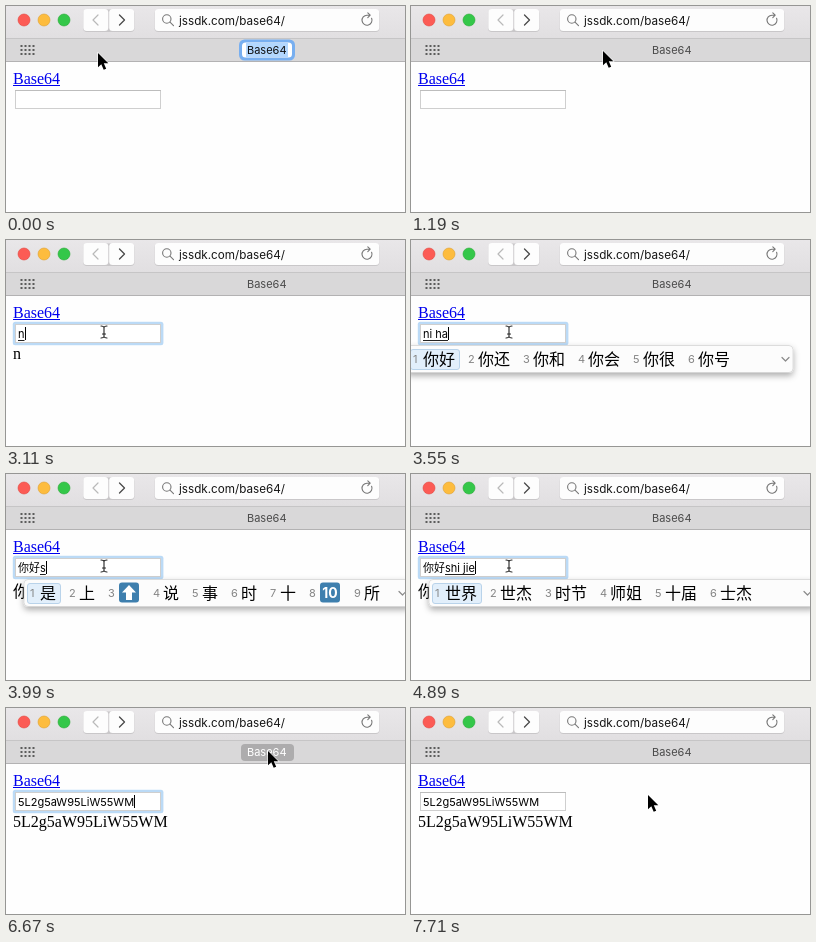
An HTML page for the animation above (8000 ms loop, 399x206 px).

```html
<!DOCTYPE html>
<html lang="zh-CN">
<head>
<meta charset="utf-8">
<title>Base64 bookmarklet</title>
<style>
  html, body { margin: 0; width: 100%; height: 100%; overflow: hidden; background: #fefefe; }
  svg { display: block; width: 100vw; height: 100vh; }
  text { white-space: pre; }
  .ui { font-family: Inter, "Noto Sans CJK SC", "Noto Sans CJK", sans-serif; font-size: 11px; }
  .page { font-family: "Liberation Serif", "Noto Sans CJK SC", "Noto Sans CJK", serif; font-size: 16px; }
  .cjk { font-family: "Noto Sans CJK SC", "Noto Sans CJK", sans-serif; font-size: 16px; }
  .line { fill: none; stroke-linecap: round; stroke-linejoin: round; }
</style>
</head>
<body>
<svg viewBox="0 0 399 206">
  <defs>
    <linearGradient id="bar" x2="0" y2="1">
      <stop stop-color="#e9e7e9"/><stop offset="1" stop-color="#e1dfe1"/>
    </linearGradient>
    <filter id="shadow" x="-10%" y="-40%" width="120%" height="200%">
      <feDropShadow dx="0" dy="3" stdDeviation="3" flood-opacity=".32"/>
    </filter>
  </defs>

  <!-- browser chrome -->
  <rect width="399" height="32" fill="url(#bar)"/>
  <rect y="32" width="399" height="23" fill="#d9d8d9"/>
  <path d="M0 32.5H399" stroke="#c6c5c6"/>
  <path d="M0 55.5H399" stroke="#b3b2b3"/>
  <g stroke-width=".6">
    <circle cx="18" cy="14" r="6" fill="#fc5b55" stroke="#e2463f"/>
    <circle cx="38" cy="14" r="6" fill="#fdbc3e" stroke="#e0a030"/>
    <circle cx="58" cy="14" r="6" fill="#34c749" stroke="#27aa35"/>
  </g>
  <g fill="#c9c7c9">
    <rect x="77" y="3.5" width="51.5" height="22.5" rx="4"/>
    <rect x="148.5" y="3.5" width="225" height="22.5" rx="4"/>
  </g>
  <g fill="#fdfdfd">
    <rect x="77.3" y="3" width="25" height="22" rx="3.5"/>
    <rect x="103.2" y="3" width="25" height="22" rx="3.5"/>
    <rect x="148.8" y="3" width="224.4" height="22" rx="3.5"/>
  </g>
  <path class="line" d="M92 9L87 14L92 19" stroke="#b9b9b9" stroke-width="1.2"/>
  <path class="line" d="M113.5 9L118.5 14L113.5 19" stroke="#4a4a4a" stroke-width="1.3"/>
  <g class="line" stroke="#777" stroke-width="1.1">
    <circle cx="160.8" cy="13" r="4.2"/><path d="M164 16.2L167.5 19.7"/>
    <path d="M365.6 12.2A5 5 0 1 1 361 9.2H363.6M361.8 6.8L364.2 9.2L361.8 11.6"/>
  </g>
  <text class="ui" x="173" y="18.5" style="font-size:11.7px" fill="#151515">jssdk.com/base64/</text>
  <g id="dots" fill="#5c5c5c"></g>

  <!-- bookmark -->
  <g id="editing">
    <rect x="233" y="33.5" width="56" height="21" rx="5.5" fill="#78aff0"/>
    <rect x="236" y="36.5" width="50" height="15" rx="3.5" fill="#fff"/>
    <rect x="240" y="37" width="42" height="14" fill="#b3d7fe"/>
  </g>
  <rect id="hover" x="235" y="36" width="53" height="17" rx="4" fill="#adacad"/>
  <text id="bookmark" class="ui" x="241" y="48">Base64</text>

  <!-- page -->
  <text class="page" x="7" y="78" fill="#0000ee">Base64</text>
  <path d="M7 79.5H54" stroke="#0000ee"/>
  <rect id="ring" x="6.8" y="81.8" width="150.6" height="23.4" rx="2.5" fill="#bbdaf6"/>
  <rect x="9.5" y="84.5" width="145" height="18" fill="#fff" stroke="#cfcfcf"/>
  <path id="fieldTop" d="M9 84.5H155" stroke="#bdbdbd"/>
  <text id="field" class="ui" x="12" y="98" fill="#000"></text>
  <path id="underline" stroke="#222" stroke-width="1"/>
  <rect id="caret" y="87" width="1" height="13"/>
  <text id="output" class="page" x="7"></text>
  <g id="panel"></g>

  <path id="arrow" d="M0 0V14.3L3.3 11.2L5.7 16.8L8.2 15.7L5.8 10.3H10.3Z" fill="#000" stroke="#fff" stroke-width="1.1" paint-order="stroke"/>
  <path id="beam" class="line" d="M-3-6Q-.5-6 0-4.6Q.5-6 3-6M0-4.6V4.6M-3 6Q-.5 6 0 4.6Q.5 6 3 6M-1.5 2H1.5" stroke="#222" stroke-width="1.1"/>
</svg>
<script>
const LOOP = 8000;
const $ = id => document.getElementById(id);
const show = (id, on) => $(id).style.display = on ? '' : 'none';
const between = (t, a, b) => t >= a && t < b;
const latest = (steps, t) => steps.filter(step => step[0] <= t).pop();

// time, x, y of the pointer
const pointer = [
  [0, 92, 47], [150, 112, 45], [290, 150, 44], [440, 173, 45],
  [1190, 192, 45], [1340, 240, 44], [1490, 261, 43], [1630, 258, 45],
  [1780, 200, 64], [1930, 122, 81], [2070, 98, 92],
  [5630, 112, 84], [5780, 194, 52], [5930, 289, 6], [6070, 261, 33],
  [6220, 262, 40], [6370, 262, 43], [7120, 257, 55], [7270, 243, 78], [7420, 237, 87]
];

// time, committed text, text being composed, candidates
const typing = [
  [0, '', '', ''],
  [3110, '', 'n', ''],
  [3260, '', 'ni', '你 呢 尼 泥 拟 逆 妮 腻 倪'],
  [3400, '', 'ni h', '你好 你会 你还 你和 你很 你化'],
  [3550, '', 'ni ha', '你好 你还 你和 你会 你很 你号'],
  [3700, '', 'ni hao', '你好 拟好 你号 你 呢 尼 泥'],
  [3840, '你好', '', ''],
  [3990, '你好', 's', '是 上 ⬆ 说 事 时 十 🔟 所'],
  [4140, '你好', 'sh', '是 上 说 事 时 十 使 受 所'],
  [4290, '你好', 'shi', '是 事 时 十 使 式 市 世 师'],
  [4440, '你好', 'shi j', '世界 时间 事件 实际 世纪 设计'],
  [4740, '你好', 'shi ji', '世纪 实际 时机 事迹 世界 十几'],
  [4890, '你好', 'shi jie', '世界 世杰 时节 师姐 十届 士杰'],
  [5190, '你好世界', '', ''],
  [6670, '5L2g5aW95LiW55WM', '', '']
];

const caretTimes = [[2370, 2820], [3110, 5630], [6220, 7120]];

function keycap(x, symbol) {
  const mark = symbol === '⬆'
    ? `<path d="M${x + 10} 111L${x + 17} 118.5H${x + 13}V126H${x + 7}V118.5H${x + 3}Z" fill="#fff"/>`
    : `<text class="ui" x="${x + 10}" y="123.5" text-anchor="middle" style="font-size:14px;font-weight:700" fill="#fff">10</text>`;
  return `<rect x="${x}" y="108.5" width="20" height="20" rx="3" fill="#3e7fae"/>` + mark;
}

function drawPanel(left, candidates) {
  if (!candidates) return '';
  const words = candidates.split(' ');
  let x = left + 6;
  let svg = `<rect x="${left}" y="105.5" width="386" height="27" rx="4" fill="#fcfcfc" stroke="#cacaca" stroke-width=".6" filter="url(#shadow)"/>
    <rect x="${left + 3.5}" y="109.5" width="${16 * words[0].length + 17}" height="20" rx="2.5" fill="#e2effb" stroke="#b9d3ea"/>`;
  words.forEach((word, i) => {
    const isKey = word === '⬆' || word === '🔟';
    svg += `<text class="ui" x="${x}" y="123" fill="#858585">${i + 1}</text>`;
    svg += isKey ? keycap(x + 11, word) : `<text class="cjk" x="${x + 10}" y="125">${word}</text>`;
    x += 23 + (isKey ? 22 : 16 * word.length);
  });
  return svg + `<path class="line" d="M${left + 375} 117.5l3.5 3.5l3.5-3.5" stroke="#8a8a8a" stroke-width="1.2"/>`;
}

let current;
function setText(state) {
  if (state === current) return;
  current = state;
  const [, done, composing, candidates] = state;
  const field = $('field');
  field.textContent = done;
  const start = 12 + (done ? field.getComputedTextLength() : 0);
  field.textContent = done + composing;
  const end = 12 + (done + composing ? field.getComputedTextLength() : 0);
  $('underline').setAttribute('d', composing ? `M${start} 100.5H${end}` : '');
  $('caret').setAttribute('x', Math.round(end));
  $('output').textContent = done + composing;
  $('output').setAttribute('y', done.startsWith('你') ? 123 : 119);
  $('panel').innerHTML = drawPanel(Math.round(start) - 16, candidates);
}

function render(t) {
  const [, x, y] = latest(pointer, t);
  const editing = t < 740;
  const hovering = between(t, 1340, 1780) || between(t, 6220, 7120);
  const overField = between(t, 2070, 5780);
  const focused = between(t, 2370, 7710);

  setText(latest(typing, t));
  show('editing', editing);
  show('hover', hovering);
  $('bookmark').setAttribute('fill', editing ? '#111' : hovering ? '#fff' : '#4b4b4b');
  show('ring', focused);
  show('fieldTop', !focused);
  show('caret', caretTimes.some(([a, b]) => between(t, a, b)));
  show('arrow', !overField);
  show('beam', overField);
  $(overField ? 'beam' : 'arrow').setAttribute('transform', `translate(${x} ${y})`);
}

for (let i = 0; i < 12; i++) {
  $('dots').innerHTML += `<rect x="${14.5 + i % 4 * 4}" y="${39 + Math.floor(i / 4) * 4}" width="2" height="2"/>`;
}

const began = performance.now();
function tick() {
  render((performance.now() - began) % LOOP);
  requestAnimationFrame(tick);
}
tick();
</script>
</body>
</html>
```
